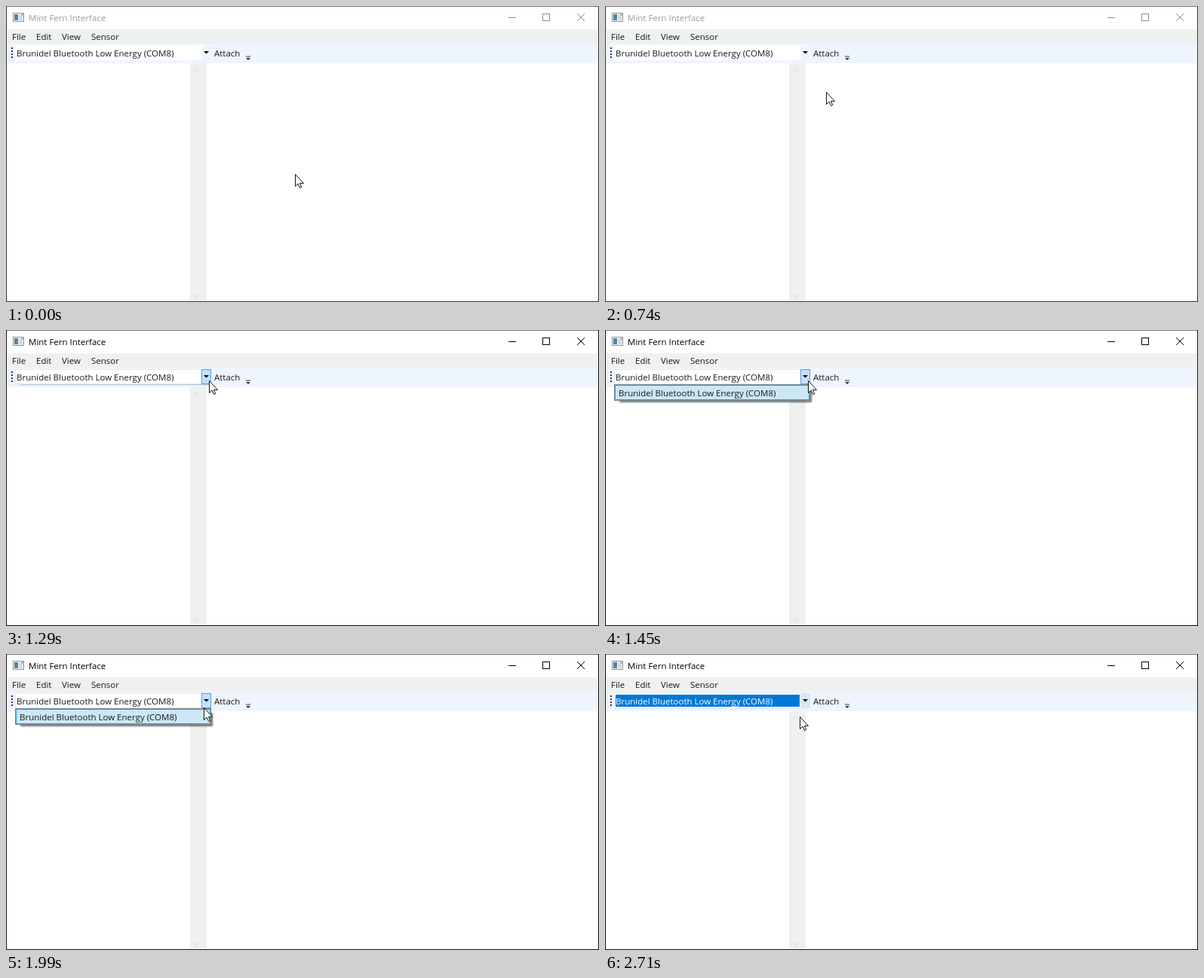
Write an HTML page that moves like this. It is 786x393 px and loops after 3.64 s.

```html
<!DOCTYPE html>
<html lang="en">
<head>
<meta charset="utf-8">
<title>Device picker</title>
<style>
  html, body { margin: 0; width: 100%; height: 100%; overflow: hidden; background: #fff; }
  svg { display: block; width: 786px; height: 393px; }
  text { font: 11.5px "Open Sans", "Noto Sans", sans-serif; fill: #1a1a1a; white-space: pre; }
  rect, .crisp { shape-rendering: crispEdges; }

  #caption { fill: #8f9f96; }
  #controls { fill: none; stroke: #8c8c8c; }
  #frame { fill: none; stroke: #333; }
  .active #caption { fill: #000; }
  .active #controls { stroke: #000; }
  .active #frame { stroke: #111; }

  #comboEdge { fill: #fff; stroke: #fff; }
  #dropButton { fill: #eef5fc; stroke: none; }
  #selection { fill: none; }
  .hover #comboEdge, .open #comboEdge, .focused #comboEdge { stroke: #e0edf9; }
  .hover #dropButton { fill: #daecfc; stroke: #7eb4ea; }
  .open #dropButton { fill: #c4e0fc; stroke: #569de5; }
  .focused #dropButton { fill: #d6e8f8; stroke: #d6e8f8; }
  .focused #selection { fill: #0078d7; }
  .focused #comboText { fill: #fff; }

  #popupLayer { display: none; }
  .open #popupLayer { display: inline; }
  #item { fill: #cbe8f6; stroke: #26a0da; }
  .itemHover #item { fill: #d1e8ff; stroke: #66a7e8; }
</style>
</head>
<body>
<svg id="stage" viewBox="0 0 786 393">
  <defs>
    <clipPath id="belowCombo"><rect x="0" y="72" width="786" height="321"/></clipPath>
    <filter id="soft" x="-5%" y="-30%" width="110%" height="160%"><feGaussianBlur stdDeviation="1.2"/></filter>
  </defs>

  <!-- Title bar -->
  <rect width="786" height="393" fill="#fff"/>
  <g class="crisp">
    <rect x="9.5" y="9.5" width="14" height="11" fill="#f4f6f7" stroke="#8b9298"/>
    <rect x="11" y="11" width="5" height="8" fill="#4d86a5"/>
    <rect x="17" y="12" width="5" height="7" fill="#d5dbdf"/>
    <rect x="20" y="11" width="3" height="1" fill="#6a7178"/>
  </g>
  <text id="caption" x="30" y="20">Mint Fern Interface</text>
  <g id="controls">
    <path class="crisp" d="M666 15.5h10M711.5 10.5h9v9h-9z"/>
    <path d="M757 10l10 10M767 10l-10 10"/>
  </g>

  <!-- Menu and toolbar -->
  <rect x="1" y="31" width="784" height="19" fill="#eef1f0"/>
  <text x="8" y="45">File</text>
  <text x="40" y="45">Edit</text>
  <text x="74" y="45">View</text>
  <text x="113" y="45">Sensor</text>
  <rect x="1" y="50" width="784" height="26" fill="#eef5fd"/>
  <path class="crisp" d="M8 55v14" stroke="#3b2b55" stroke-width="2" stroke-dasharray="2 2"/>
  <rect id="comboEdge" x="12.5" y="52.5" width="259" height="19"/>
  <rect id="selection" x="14" y="54" width="244" height="16"/>
  <text id="comboText" x="14" y="67">Brunidel Bluetooth Low Energy (COM8)</text>
  <rect id="dropButton" x="259.5" y="52.5" width="12" height="19"/>
  <path d="M262 60h7l-3.5 3.5z"/>
  <text x="276" y="67">Attach</text>
  <path d="M318 66.5h6v1h-6zM318 69h6l-3 3z" fill="#3b2b55"/>

  <!-- Side scroll bar -->
  <rect x="244" y="76" width="22" height="316" fill="#eef1f0"/>
  <path d="M249 87l3.5-4 3.5 4M249 383l3.5 4 3.5-4" fill="none" stroke="#e0e3e2" stroke-width="1.3"/>

  <rect id="frame" x=".5" y=".5" width="785" height="392"/>
  <path class="crisp" d="M1 .5h784" stroke="#777"/>

  <g id="popupLayer" clip-path="url(#belowCombo)">
    <g id="popup">
      <rect x="19" y="78" width="255" height="18" fill="#000" opacity=".55" filter="url(#soft)"/>
      <rect x="12.5" y="72.5" width="259" height="21" fill="#fff" stroke="#858b91"/>
      <rect id="item" x="13.5" y="73.5" width="257" height="19"/>
      <text x="18" y="88">Brunidel Bluetooth Low Energy (COM8)</text>
    </g>
  </g>

  <path id="cursor" d="M.5 .5v16l3.6-3.4 2.5 5.4 2.2-1-2.4-5.1h5.1z" fill="#fff" stroke="#111"/>
</svg>

<script>
  const LOOP = 3640;
  const byId = id => document.getElementById(id);
  const linear = u => u;
  const easeOut = u => 1 - (1 - u) ** 2;

  // The pointer advances in discrete samples; the first lands at `from`, the last at `to`.
  const moves = [
    { from: 270, to: 740, steps: 7, x: 293, y: 114, ease: linear },
    { from: 830, to: 1140, steps: 5, x: 269, y: 67, ease: easeOut },
    { from: 1750, to: 1990, steps: 4, x: 262, y: 71, ease: linear },
    { from: 2070, to: 2160, steps: 2, x: 259, y: 74, ease: linear },
    { from: 2310, to: 2460, steps: 3, x: 258, y: 83, ease: linear }
  ];

  function pointerAt(time) {
    let x = 383, y = 223;
    for (const move of moves) {
      if (time < move.from) break;
      const sample = Math.floor((time - move.from) / (move.to - move.from) * (move.steps - 1) + 0.02);
      const p = move.ease(Math.min(1, (sample + 1) / move.steps));
      x += (move.x - x) * p;
      y += (move.y - y) * p;
    }
    return [Math.round(x), Math.round(y)];
  }

  function render(time) {
    const during = (from, to) => time >= from && time < to;
    const states = {
      active: time >= 1290,
      hover: during(1060, 1290),
      open: during(1290, 2710),
      itemHover: during(2070, 2710),
      focused: time >= 2710
    };
    for (const name in states) byId("stage").classList.toggle(name, states[name]);

    const slide = time < 1370 ? -24 : time < 1450 ? -11 : 0;
    byId("popup").setAttribute("transform", `translate(0 ${slide})`);
    byId("cursor").setAttribute("transform", `translate(${pointerAt(time)})`);
  }

  const start = performance.now();
  function tick() {
    render((performance.now() - start) % LOOP);
    requestAnimationFrame(tick);
  }
  tick();
</script>
</body>
</html>
```
